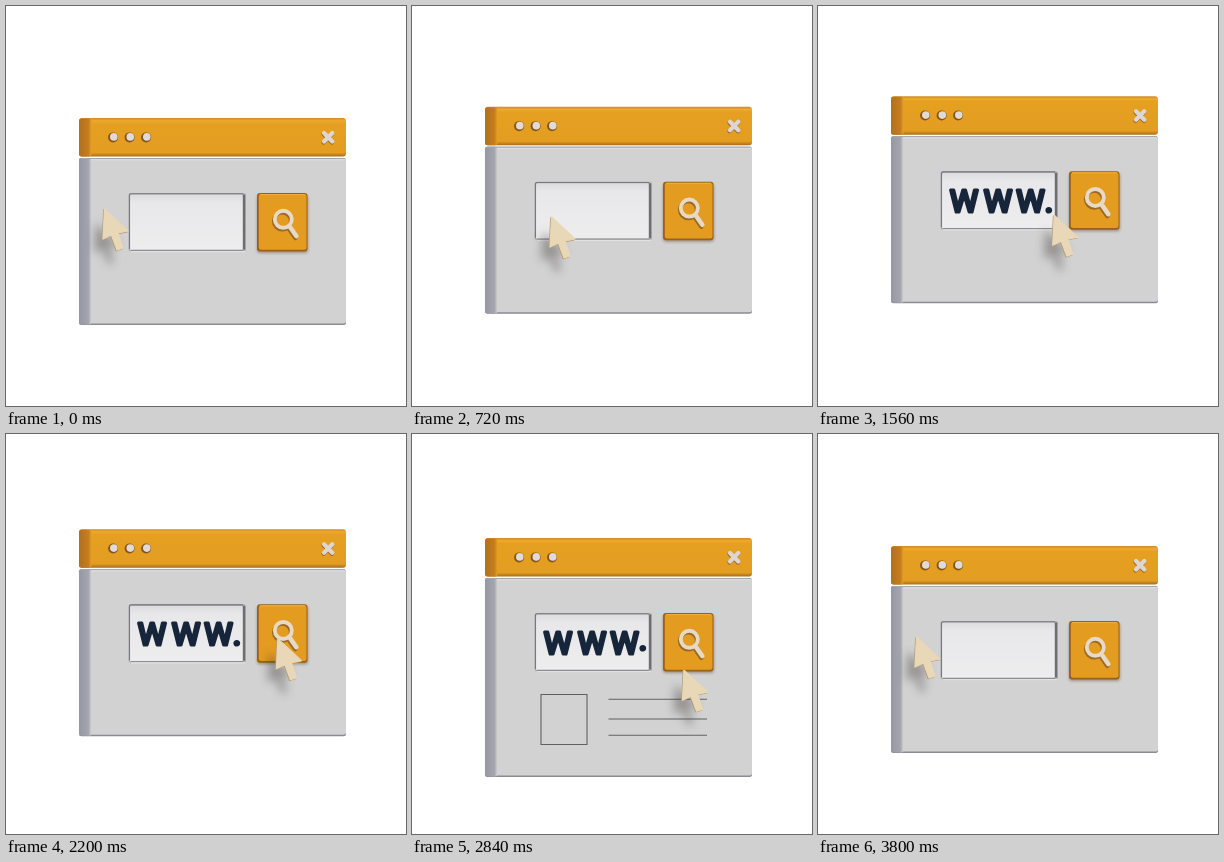
An HTML page that plays this animation: 400 px wide and 400 px high, repeating every 3840 ms.

```html
<!DOCTYPE html>
<html>
<head>
<meta charset="utf-8">
<style>
html, body { margin: 0; width: 100%; height: 100%; overflow: hidden; background: #fff; }
svg { display: block; width: 100vw; height: 100vh; }
text { font: 400 32px Roboto, sans-serif; text-anchor: middle; fill: #16253a; stroke: #16253a; stroke-width: 3.2; stroke-linejoin: round; }
</style>
</head>
<body>
<svg viewBox="0 0 400 400">
  <defs>
    <linearGradient id="bar" x1="0" y1="0" x2="0" y2="1">
      <stop offset="0" stop-color="#c98c26"/><stop offset=".07" stop-color="#eeaa2c"/>
      <stop offset=".14" stop-color="#e5a022"/><stop offset=".9" stop-color="#e39d20"/>
      <stop offset="1" stop-color="#a86c18"/>
    </linearGradient>
    <linearGradient id="barSide">
      <stop offset="0" stop-color="#b3701b"/><stop offset=".75" stop-color="#c47d1f"/>
      <stop offset="1" stop-color="#e5a022"/>
    </linearGradient>
    <linearGradient id="side">
      <stop offset="0" stop-color="#9598a3"/><stop offset=".75" stop-color="#a3a5af"/>
      <stop offset="1" stop-color="#d2d2d3"/>
    </linearGradient>
    <linearGradient id="well" x1="0" y1="0" x2="0" y2="1">
      <stop offset="0" stop-color="#dcdcde"/><stop offset=".15" stop-color="#e8e8ea"/>
      <stop offset="1" stop-color="#ededee"/>
    </linearGradient>
    <filter id="soft" x="-50%" y="-50%" width="200%" height="200%"><feGaussianBlur stdDeviation="1.6"/></filter>
    <filter id="haze" x="-100%" y="-100%" width="300%" height="300%"><feGaussianBlur stdDeviation="5"/></filter>
    <path id="arrow" d="M0 1L-1.500 31L7 27L12.500 42L18.500 40L13.500 25L23.500 23Z" stroke-width="1.2" stroke-linejoin="round"/>
    <g id="lens" fill="none" stroke-width="3.900" stroke-linecap="round">
      <circle cx="277.300" cy="213.300" r="8.500"/><path d="M284 221L290.300 230" stroke-width="4.600"/>
    </g>
  </defs>
  <g id="win">
    <rect id="edge" x="73" y="152" width="267" rx="2.500" fill="#8b8c92"/>
    <rect id="face" x="73" y="152" width="267" rx="2.500" fill="#d2d2d3"/>
    <rect id="flank" x="73" y="152" width="12.500" rx="2" fill="url(#side)"/>
    <path d="M75 152.500H339" stroke="#a4a4a9"/>
    <path d="M85 153.700H339" stroke="#dfdfe1"/>
    <rect x="73" y="112" width="267" height="38.500" rx="3" fill="url(#bar)"/>
    <rect x="73" y="112.500" width="12.500" height="38" rx="2.500" fill="url(#barSide)"/>
    <g id="dots"></g>
    <g fill="none" stroke-linecap="round" stroke-width="4.200">
      <path d="M317.500 128L326 136.500M326 128L317.500 136.500" stroke="#97682c"/>
      <path d="M318 127L326.300 135.500M326.300 127L318 135.500" stroke="#ded6d1"/>
    </g>
    <rect x="122.500" y="187" width="117.500" height="58.500" rx="2.500" fill="#b0b0b3"/>
    <rect x="124" y="188.500" width="113" height="55.500" rx="1.500" fill="url(#well)"/>
    <path d="M123.500 243V189Q123.500 187.700 125 187.700H237" fill="none" stroke="#77777b" stroke-width="1.100"/>
    <path d="M238 188.500V243.500" stroke="#6e6e72" stroke-width="2.400"/>
    <path d="M125 244.300H237" stroke="#8c8c90" stroke-width="1.200"/>
    <path d="M125 245.600H239" stroke="#e6e6e8"/>
    <rect x="251" y="189" width="51" height="58" rx="3" fill="#9d8f7f" filter="url(#soft)"/>
    <rect x="251" y="187" width="50.500" height="58.500" rx="3" fill="#99611b"/>
    <rect x="252.800" y="188" width="47.700" height="55.700" rx="2.500" fill="#e39c20"/>
    <path d="M254 188.600H299" stroke="#eeb045"/>
    <use href="#lens" x="-1" y="1.800" stroke="#9a6826"/>
    <use href="#lens" stroke="#e6d9c6"/>
    <g id="word"></g>
    <g id="wires" fill="none" stroke="#606064" stroke-width="1.100" stroke-dasharray="1 2">
      <path pathLength="1" d="M175 268.500H129V318.500H175Z"/>
      <path pathLength="1" d="M196.500 273.200H295"/>
      <path pathLength="1" d="M196.500 293H295"/>
      <path pathLength="1" d="M196.500 309.300H295"/>
    </g>
  </g>
  <g id="hand">
    <use href="#arrow" x="-9" y="14" fill="#3c3836" opacity=".4" filter="url(#haze)"/>
    <use href="#arrow" x="-.8" y=".8" fill="#b79f79" stroke="#b79f79"/>
    <use href="#arrow" fill="#e8d8b8" stroke="#e8d8b8"/>
  </g>
</svg>
<script>
const LOOP = 3840;
const $ = id => document.getElementById(id);
const ramp = (t, a, b) => Math.min(1, Math.max(0, (t - a) / (b - a)));
const ease = (t, a, b) => (1 - Math.cos(Math.PI * ramp(t, a, b))) / 2;
const hump = (t, a, b, c) => ease(t, a, b) - ease(t, b, c);
const set = (el, attrs) => { for (const k in attrs) el.setAttribute(k, attrs[k]); };

function add(parent, tag, attrs) {
  const el = document.createElementNS('http://www.w3.org/2000/svg', tag);
  set(el, attrs);
  return parent.appendChild(el);
}

for (const x of [107.5, 124, 140.5]) {
  add($('dots'), 'circle', { cx: x - .4, cy: 131.4, r: 5, fill: '#84541f' });
  add($('dots'), 'circle', { cx: x + .3, cy: 130.9, r: 3.8, fill: '#e2dad5' });
}

const glyphs = [['W', 146, 2226], ['W', 180, 2262], ['W', 212.5, 2302], ['.', 231, 2492]]
  .map(([ch, x, hop]) => {
    const el = add($('word'), 'text', {});
    el.textContent = ch;
    return { el, x, hop };
  });
const wires = [...$('wires').children];

function drawWord(t) {
  glyphs.forEach(({ el, x, hop }, i) => {
    const shown = ease(t, 860 + i * 140, 1060 + i * 140) - ease(t, 3560 - i * 60, 3700 - i * 60);
    const u = (t - hop) / 280;
    const dy = u > 0 && u < 1.5 ? -7.5 * Math.sin(2 * Math.PI * u) * (1 - ramp(u, 1.05, 1.5)) : 0;
    set(el, {
      transform: `translate(${x} ${216.3 + dy}) scale(${shown}) translate(0 11.5)`,
      visibility: shown > .01 ? 'visible' : 'hidden'
    });
  });
}

function drawHand(t, lift) {
  const go = ease(t, 0, 2230), down = ease(t, 2300, 3160), back = ease(t, 3160, 3780);
  const x = 98.5 + 173.5 * (go - back);
  const y = 202 + 18.5 * go + 22 * Math.sin(Math.PI * go) + 32.5 * down - 51 * back;
  const press = 1 - .12 * (ease(t, 2220, 2360) - ease(t, 2480, 2700));
  set($('hand'), {
    transform: `translate(${x + 10} ${y + lift + 21}) scale(${press}) translate(-10 -21)`
  });
}

function draw(t) {
  const lift = -22 * hump(t, 0, 1420, LOOP);
  const grow = 32 * (ease(t, 2240, 2480) - ease(t, 3400, 3700));
  const tilt = hump(t, 2240, 2360, 2550);
  const dx = -6 * Math.sqrt(Math.max(0, tilt));
  const dy = lift - 2.5 * tilt + 1.4 * hump(t, 2400, 2520, 2700);
  set($('win'), {
    transform: `translate(${dx} ${dy}) rotate(${-12.5 * tilt} 207 ${215.5 + grow / 2})`
  });
  set($('edge'), { height: 167 + grow });
  set($('face'), { height: 165.5 + grow });
  set($('flank'), { height: 166.5 + grow });

  const drawn = ramp(t, 2280, 2600) - ramp(t, 3200, 3440);
  for (const w of wires) set(w, { 'stroke-dashoffset': 1 - drawn });
  $('wires').setAttribute('visibility', drawn > .001 ? 'visible' : 'hidden');

  drawWord(t);
  drawHand(t, lift);
}

const start = performance.now();
function tick() {
  draw((performance.now() - start) % LOOP);
  requestAnimationFrame(tick);
}
tick();
</script>
</body>
</html>
```
